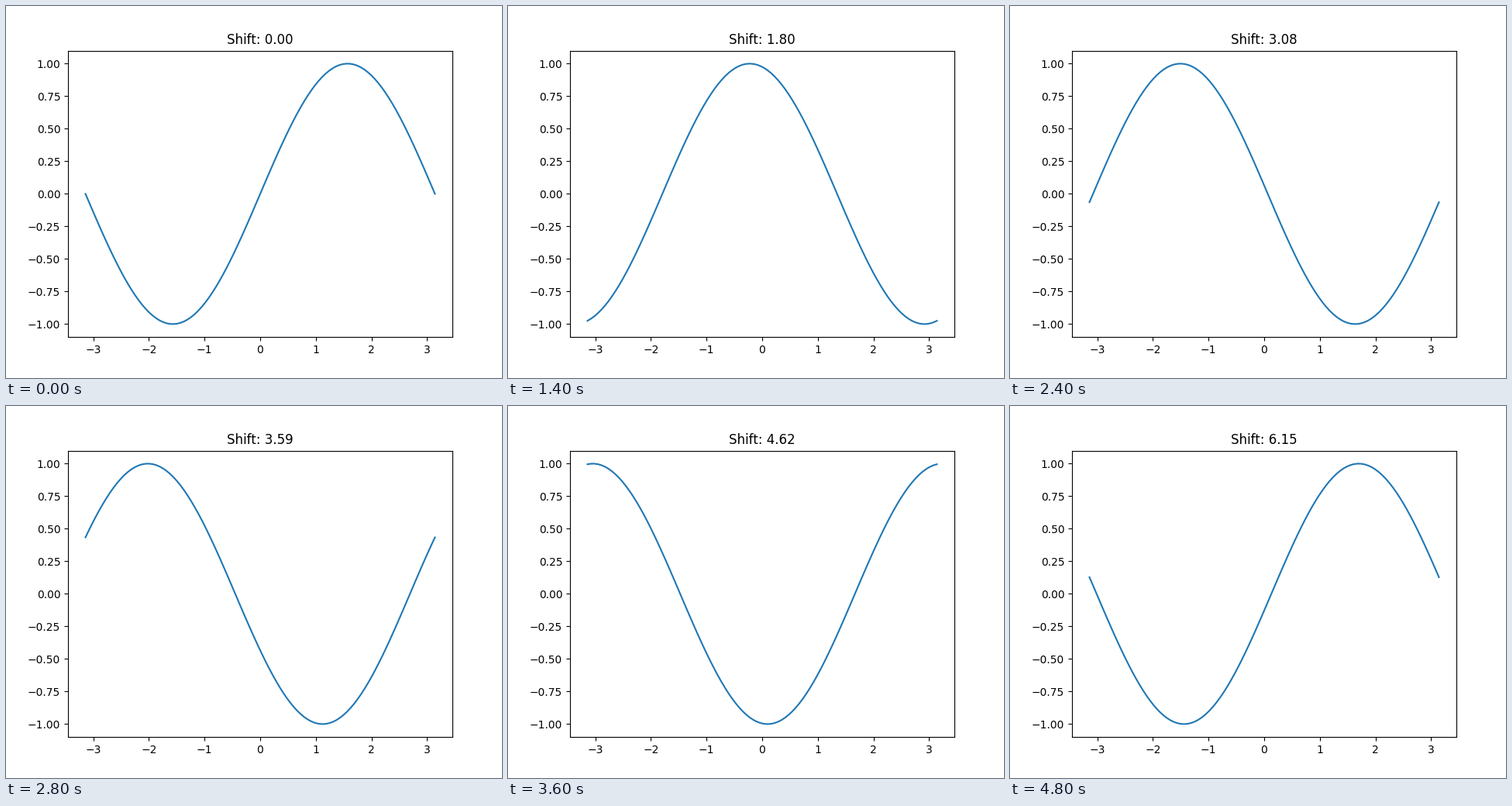
Recreate the animation shown at these times as a matplotlib script. Size 640 px wide and 480 px high, loop 4900 ms.

```python
import numpy as np
import matplotlib.pyplot as plt
from matplotlib.animation import FuncAnimation

FRAMES = 49
INTERVAL = 100

x = np.linspace(-np.pi, np.pi, 100)

fig, ax = plt.subplots(figsize=(6.4, 4.8), dpi=100)
line, = ax.plot(x, np.sin(x))
title = ax.set_title("Shift: 0.00")


def update(i):
    shift = 2 * np.pi * i / FRAMES
    line.set_ydata(np.sin(x + shift))
    title.set_text(f"Shift: {shift:.2f}")
    return line, title


anim = FuncAnimation(fig, update, frames=FRAMES, interval=INTERVAL,
                     repeat=True, repeat_delay=0)
plt.show()
```
